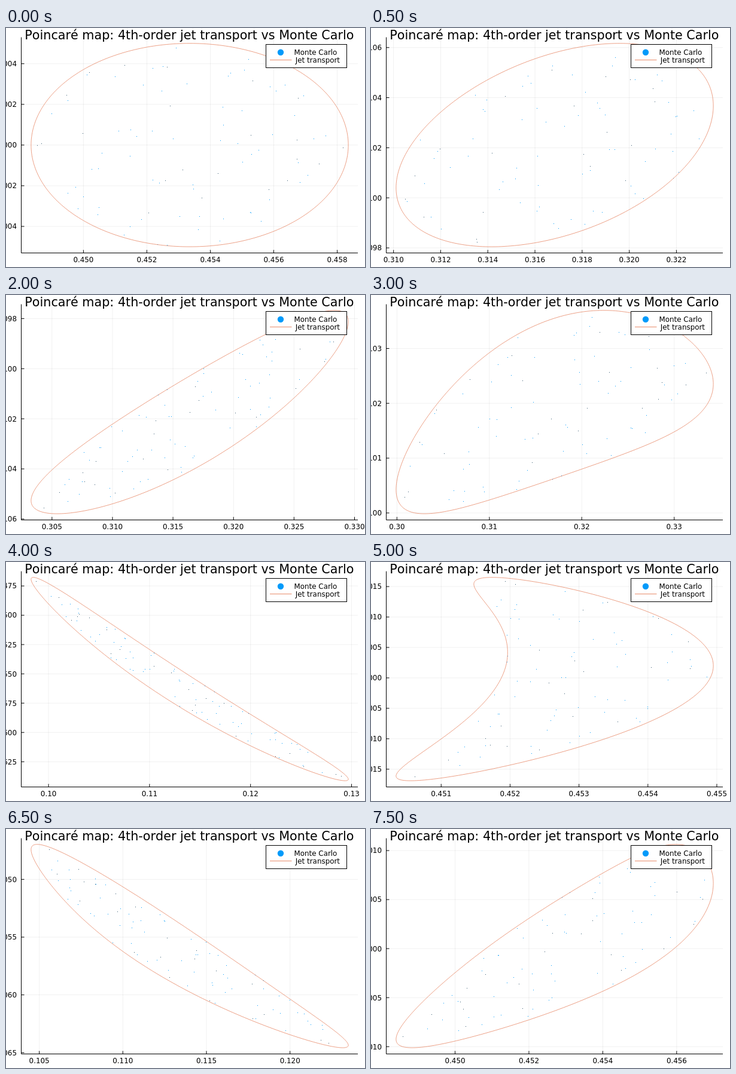
These frames come from a looping animation (600 px wide and 400 px high, 8000 ms). An HTML page:

```html
<!DOCTYPE html>
<html lang="en">
<head>
<meta charset="utf-8">
<title>Poincaré map</title>
<style>
  html, body { margin: 0; width: 100%; height: 100%; overflow: hidden; background: #fff; }
  svg { display: block; width: 600px; height: 400px; font: 11.9px "DejaVu Sans", sans-serif; font-kerning: none; }
  .title { font-size: 20.72px; text-anchor: middle; }
  .axis { fill: none; stroke: #000; }
  .grid { fill: none; stroke: #000; stroke-opacity: .06; }
  .jet { fill: none; stroke: #e26f46; stroke-width: .65; stroke-linejoin: round; }
</style>
</head>
<body>
<svg viewBox="0 0 600 400">
  <path class="grid" id="grid"/>
  <path class="axis" d="M25.5 15.5V376.5H588"/>
  <path class="axis" id="marks"/>
  <path id="blueDots" fill="#009afa"/>
  <path id="darkDots" fill="#35596f"/>
  <path class="jet" id="curve"/>
  <g id="labels"></g>
  <text class="title" x="306.4" y="18.7">Poincaré map: 4th-order jet transport vs Monte Carlo</text>
  <rect x="434.5" y="27.5" width="135" height="39" fill="#fff" stroke="#000"/>
  <circle cx="459" cy="40.8" r="5.2" fill="#009afa"/>
  <path class="jet" d="M441 53.5H477.5" style="stroke-width: .8"/>
  <text x="481.5" y="45">Monte Carlo</text>
  <text x="483.8" y="58">Jet transport</text>
</svg>
<script>
const start = performance.now();
const FRAMES = 16, HOLD = 500;
const ENERGY = 0.1025, CENTER = 0.45335, RADIUS = 0.005;
const AREA = { left: 26, right: 588, top: 15.5, bottom: 376.3 };
const $ = id => document.getElementById(id);

// Hénon–Heiles flow, state [x, y, px, py]
const flow = ([x, y, px, py]) => [px, py, -x - 2 * x * y, -y - x * x + y * y];

// The same flow with x as the independent variable
const flowInX = s => flow(s).map(v => v / s[2]);

const shift = (s, d, h) => [s[0] + h * d[0], s[1] + h * d[1], s[2] + h * d[2], s[3] + h * d[3]];

function rk4(f, s, h) {
  const a = f(s), b = f(shift(s, a, h / 2)), c = f(shift(s, b, h / 2)), d = f(shift(s, c, h));
  return s.map((v, i) => v + h / 6 * (a[i] + 2 * b[i] + 2 * c[i] + d[i]));
}

// Successive crossings of x = 0 with px > 0, as [y, py]
function crossings(dy, py, dt) {
  const y = CENTER + dy;
  let s = [0, y, Math.sqrt(2 * ENERGY - y * y + 2 * y ** 3 / 3 - py * py), py];
  const found = [[y, py]];
  for (let n = 0; found.length < FRAMES && n < 20000; n++) {
    const next = rk4(flow, s, dt);
    if (s[0] < 0 && next[0] >= 0) {
      const hit = rk4(flowInX, next, -next[0]);
      found.push([hit[1], hit[3]]);
    }
    s = next;
  }
  return found;
}

const polar = (r, angle, dt) => crossings(r * Math.cos(angle), r * Math.sin(angle), dt);

// Fourth-order expansion along a few directions, carried out to the full radius
const DIRECTIONS = 6, REACH = 8, NODES = [-2, -1, 0, 1, 2];
const weights = at => NODES.map(j =>
  NODES.reduce((w, k) => k === j ? w : w * (at - k) / (j - k), 1));

function jetSamples() {
  const samples = [];
  for (let i = 0; i < DIRECTIONS; i++) {
    const angle = Math.PI * i / DIRECTIONS;
    const orbits = NODES.map(j => polar(RADIUS * j / REACH, angle, 0.025));
    const extend = at => {
      const w = weights(at);
      return orbits[0].map((_, n) => [0, 1].map(c =>
        orbits.reduce((sum, orbit, j) => sum + w[j] * orbit[n][c], 0)));
    };
    samples[i] = extend(REACH);
    samples[i + DIRECTIONS] = extend(-REACH);
  }
  return samples;
}

// A fourth-order jet of a circle is a trigonometric polynomial of degree four
function kernel(phi) {
  let sum = 1;
  for (let k = 1; k <= 4; k++) sum += 2 * Math.cos(k * phi);
  return sum / (2 * DIRECTIONS);
}

const samples = jetSamples();
function jetCurve(n, count = 300) {
  return Array.from({ length: count }, (_, i) => {
    const point = [0, 0];
    samples.forEach((sample, j) => {
      const w = kernel(2 * Math.PI * i / count - Math.PI * j / DIRECTIONS);
      point[0] += w * sample[n][0];
      point[1] += w * sample[n][1];
    });
    return point;
  });
}

let seed = 20177;
const random = () => (seed = seed * 16807 % 2147483647) / 2147483647;
const cloud = Array.from({ length: 88 }, () =>
  polar(RADIUS * Math.sqrt(random()), 2 * Math.PI * random(), 0.05));

function limits(values) {
  const lo = Math.min(...values), hi = Math.max(...values), pad = 0.03 * (hi - lo);
  return [lo - pad, hi + pad];
}

function ticks([lo, hi]) {
  const unit = 10 ** Math.floor(Math.log10(hi - lo));
  const count = step => Math.floor(hi / step) - Math.ceil(lo / step) + 1;
  let factor = [5, 2, 1, 0.5, 0.2].find(m => count(m * unit) >= 4) || 0.1;
  if (count(factor * unit) > 8) factor = 0.25;
  const step = factor * unit;
  const digits = -Math.floor(Math.log10(step) + 1e-9) + (factor === 0.25 ? 1 : 0);
  return Array.from({ length: count(step) }, (_, i) => {
    const value = (Math.ceil(lo / step) + i) * step;
    return { value, text: value.toFixed(digits).replace("-", "−") };
  });
}

const label = (x, y, anchor, text) =>
  `<text x="${x.toFixed(1)}" y="${y.toFixed(1)}" text-anchor="${anchor}">${text}</text>`;

function buildScene(n) {
  const curve = jetCurve(n);
  const xs = limits(curve.map(p => p[0])), ys = limits(curve.map(p => p[1]));
  const toX = v => AREA.left + (v - xs[0]) / (xs[1] - xs[0]) * (AREA.right - AREA.left);
  const toY = v => AREA.bottom - (v - ys[0]) / (ys[1] - ys[0]) * (AREA.bottom - AREA.top);
  const scene = { grid: "", marks: "", labels: "", blueDots: "", darkDots: "" };

  for (const { value, text } of ticks(xs)) {
    const x = toX(value);
    scene.grid += `M${x.toFixed(2)} 15.5V376`;
    scene.marks += `M${x.toFixed(2)} 376.5v-5`;
    scene.labels += label(x, 392, "middle", text);
  }
  for (const { value, text } of ticks(ys)) {
    const y = toY(value);
    scene.grid += `M26 ${y.toFixed(2)}H588`;
    scene.marks += `M25.5 ${y.toFixed(2)}h5`;
    scene.labels += label(18, y + 4.3, "end", text);
  }
  cloud.forEach((orbit, i) => {
    const [y, py] = orbit[n];
    scene[i % 4 ? "blueDots" : "darkDots"] += `M${Math.floor(toX(y))} ${Math.floor(toY(py))}h1v1h-1z`;
  });
  scene.curve = "M" + curve.map(p => toX(p[0]).toFixed(2) + " " + toY(p[1]).toFixed(2)).join("L") + "Z";
  return scene;
}

const scenes = Array.from({ length: FRAMES }, (_, n) => buildScene(n));
let shown = -1;

function render(time) {
  const n = Math.floor(Math.max(0, time) / HOLD) % FRAMES;
  if (n === shown) return;
  shown = n;
  const { labels, ...paths } = scenes[n];
  for (const id in paths) $(id).setAttribute("d", paths[id]);
  $("labels").innerHTML = labels;
}

function loop(now) {
  render(now - start);
  requestAnimationFrame(loop);
}
render(0);
requestAnimationFrame(loop);
</script>
</body>
</html>
```
